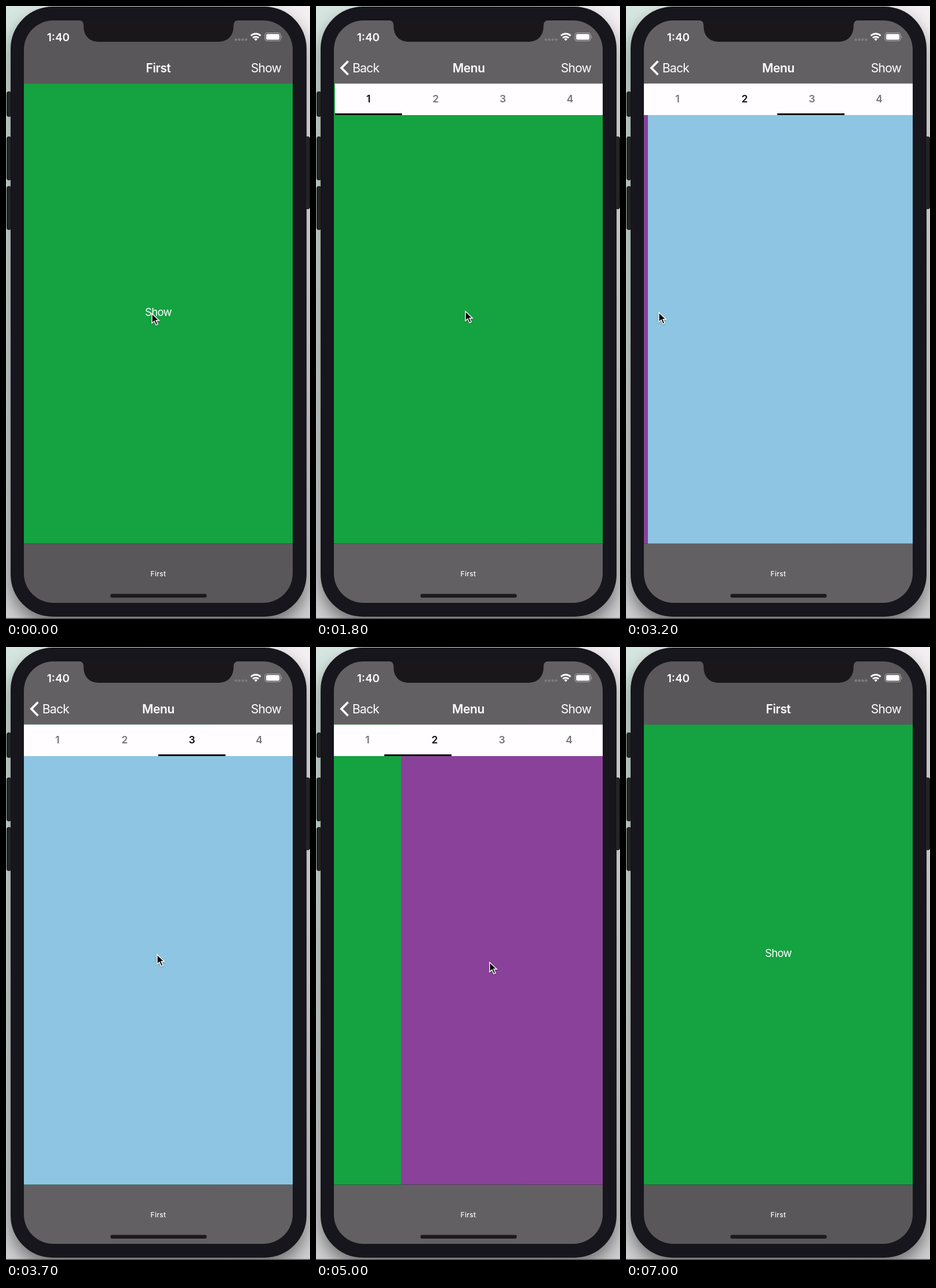
Recreate the animation shown at these times as an HTML page. Size 527 by 1062 pixels, loop 7.1 s.

```html
<!DOCTYPE html>
<html lang="en">
<head>
<meta charset="utf-8">
<title>Tabbed menu</title>
<style>
  html, body { margin: 0; width: 100%; height: 100%; overflow: hidden; }
  svg { display: block; width: 527px; height: 1062px; }
  text { font-family: Inter, "Open Sans", sans-serif; fill: #fff; }
  .title { font-size: 21px; font-weight: 600; letter-spacing: -.4px; text-anchor: middle; }
  .item { font-size: 21.2px; letter-spacing: -.8px; }
  .button { font-size: 18.6px; letter-spacing: -.7px; text-anchor: middle; }
  .small { font-size: 12px; font-weight: 500; letter-spacing: .3px; text-anchor: middle; }
  .tab { font-size: 17.5px; font-weight: 600; text-anchor: middle; }
</style>
</head>
<body>
<svg viewBox="0 0 527 1062">
  <defs>
    <linearGradient id="desk">
      <stop offset="0" stop-color="#d3e4de"/>
      <stop offset=".2" stop-color="#e4ebe9"/>
      <stop offset="1" stop-color="#f3eff2"/>
    </linearGradient>
    <linearGradient id="floor" x2="0" y2="1">
      <stop offset=".3" stop-color="#d0d0d2" stop-opacity="0"/>
      <stop offset="1" stop-color="#d0d0d2"/>
    </linearGradient>
    <filter id="shade" x="-20%" y="-10%" width="140%" height="120%">
      <feDropShadow dx="0" dy="14" stdDeviation="14" flood-opacity=".45"/>
    </filter>
    <filter id="soft" x="-50%" y="-50%" width="200%" height="200%">
      <feDropShadow dx="0" dy="1" stdDeviation="1" flood-opacity=".4"/>
    </filter>
    <clipPath id="screen"><rect x="31" y="25" width="466" height="1009" rx="51"/></clipPath>
    <clipPath id="content"><rect x="31" y="134.5" width="466" height="797"/></clipPath>
  </defs>

  <rect width="527" height="1062" fill="url(#desk)"/>
  <rect width="527" height="1062" fill="url(#floor)"/>
  <rect x="8" y="1" width="513" height="1057" rx="73" fill="#19171a" filter="url(#shade)"/>
  <g fill="#242427" stroke="#111013">
    <rect x="1.5" y="148.5" width="7" height="43" rx="3"/>
    <rect x="1.5" y="226.5" width="7" height="75" rx="3"/>
    <rect x="1.5" y="312.5" width="7" height="75" rx="3"/>
    <rect x="519.5" y="226.5" width="7" height="125" rx="3"/>
  </g>
  <rect y="1060.5" width="527" height="1.5" fill="#4b4b4d"/>

  <g clip-path="url(#screen)">
    <rect id="bars" x="31" y="25" width="466" height="1009"/>
    <g clip-path="url(#content)">
      <g id="first">
        <rect x="31" y="134" width="466" height="798" fill="#15a241"/>
        <text id="show" class="button" x="264" y="536.5">Show</text>
      </g>
      <rect id="dim" x="31" y="134" width="466" height="798"/>
      <g id="menu">
        <svg x="31" y="134" width="466" height="798">
          <g id="pages">
            <rect width="467" height="798" fill="#15a241"/>
            <rect x="466" width="466" height="798" fill="#8a4199"/>
            <rect x="932" width="466" height="798" fill="#8dc5e2"/>
          </g>
          <rect width="466" height="55" fill="#fffdff"/>
          <g id="tabs"></g>
          <rect id="line" y="52" width="116.5" height="3" fill="#0b090b"/>
        </svg>
      </g>
    </g>
    <path d="M31 931.5H497" stroke="#000" stroke-opacity=".25"/>

    <text id="firstTitle" class="title" y="115">First</text>
    <text id="menuTitle" class="title" y="115">Menu</text>
    <g id="back">
      <path d="M55.5 95.500 44 107.300 55.500 119" fill="none" stroke="#fff" stroke-width="3.8"/>
      <text class="item" x="63" y="114.500">Back</text>
    </g>
    <text class="item" x="424.500" y="114.500">Show</text>
    <text class="small" x="264" y="988">First</text>
    <rect x="181" y="1018.500" width="167" height="6.500" rx="3.200" fill="#1c1a1d"/>

    <path d="M125 24.500q9.500 0 9.500 9.500c0 18 10 28 28 28H366.500c18 0 28-10 28-28q0-9.500 9.500-9.500z" fill="#19171a"/>
    <text x="90.700" y="60.500" font-size="19" font-weight="600" text-anchor="middle">1:40</text>
    <path d="M398.500 58.200h18" stroke="#7f7c80" stroke-width="4.600" stroke-linecap="round" stroke-dasharray="0 5.900"/>
    <g fill="none" stroke="#fff" stroke-width="2.900">
      <path d="M424.600 51.500a12 12 0 0 1 16.800 0M427.800 55.300a7.500 7.500 0 0 1 10.400 0"/>
      <path d="M430.200 57.300 433 60.500 435.800 57.300a4 4 0 0 0-5.600 0z" fill="#fff" stroke="none"/>
    </g>
    <rect x="449" y="46.500" width="27" height="14" rx="4" fill="none" stroke="#aaa8ab" stroke-width="1.200"/>
    <rect x="451" y="48.500" width="23" height="10" rx="2.200" fill="#fff"/>
    <path d="M477.500 51.500q2 2 0 4.500z" fill="#aaa8ab"/>
  </g>

  <g id="cursor" filter="url(#soft)">
    <path d="M1 2V18.500L5 14.800 8.200 21.800 11.200 20.500 8.100 13.700H13.300Z" fill="#050505" stroke="#fff" stroke-width="1.400"/>
  </g>
</svg>
<script>
const LOOP = 7100, STEP = 100, WIDTH = 466, TAB = WIDTH / 4;
const $ = id => document.getElementById(id);

// Keys are [time in units of 100 ms, value].
const push = [[13, 0], [14, .16], [15, .68], [16, .92], [17, .98], [18, .9966], [19, 1],
  [56, 1], [57, .88], [58, .55], [59, .2], [60, .05], [61, .01], [62, 0]];
const page = [[19, 0], [20, .04], [21, .25], [22, .7], [23, .93], [25, 1], [26, 1],
  [27, 1.0064], [28, 1.15], [29, 1.45], [30, 1.8], [31, 1.95], [32, 1.985], [34, 2],
  [41, 2], [42, 1.85], [43, 1.4], [44, 1.075], [45, 1.02], [46, 1],
  [49, 1], [50, .75], [51, .35], [52, .1], [53, .02], [54, 0]];
const cursorX = [[0, 252], [1, 258], [19, 258], [20, 240], [22, 60], [23, 90], [26, 264],
  [27, 253], [28, 190], [29, 60], [30, 28], [33, 70], [37, 261], [41, 225], [42, 290],
  [43, 440], [44, 486], [46, 380], [48, 200], [49, 190], [50, 300], [51, 450], [52, 470],
  [55, 174], [56, 174], [57, 230], [58, 380], [59, 450]];
const cursorY = [[0, 531], [1, 527], [27, 527], [37, 531], [44, 546], [55, 543]];
const selection = [[0, 0], [25, 1], [34, 2], [46, 1], [54, 0]];

function valueAt(keys, time) {
  const next = keys.findIndex(key => key[0] > time);
  if (next === 0) return keys[0][1];
  if (next < 0) return keys[keys.length - 1][1];
  const [t0, a] = keys[next - 1], [t1, b] = keys[next];
  return a + (b - a) * (time - t0) / (t1 - t0);
}

const move = (id, x, y = 0) => $(id).setAttribute("transform", `translate(${x} ${y})`);
const fade = (id, opacity) => $(id).setAttribute("opacity", opacity);

const labels = [1, 2, 3, 4].map((n, i) => {
  const label = document.createElementNS("http://www.w3.org/2000/svg", "text");
  label.setAttribute("class", "tab");
  label.setAttribute("x", TAB * (i + .5));
  label.setAttribute("y", 33);
  label.textContent = n;
  return $("tabs").appendChild(label);
});

function draw(now) {
  const time = Math.floor(now % LOOP / STEP);
  const shown = valueAt(push, time), scroll = valueAt(page, time);
  const selected = selection.filter(key => key[0] <= time).pop()[1];
  const gray = [90, 87, 90].map(c => c + 9 * shown);

  $("bars").style.fill = `rgb(${gray})`;
  move("first", -.3 * WIDTH * shown);
  fade("show", time >= 10 && time < 14 ? .35 : 1);
  fade("dim", .1 * shown * (shown < .99));
  move("menu", WIDTH * (1 - shown));
  fade("menu", shown > 0 ? 1 : 0);
  move("pages", -WIDTH * scroll);
  move("line", TAB * scroll);
  labels.forEach((label, i) => label.style.fill = i === selected ? "#0b090b" : "#77747a");

  move("firstTitle", 264 - 150 * shown);
  fade("firstTitle", Math.max(0, 1 - 1.5 * shown));
  move("menuTitle", 264 + 200 * (1 - shown));
  fade("menuTitle", shown);
  move("back", 50 * (1 - shown));
  fade("back", shown);

  move("cursor", valueAt(cursorX, time), valueAt(cursorY, time));
  fade("cursor", time < 62 ? 1 : 0);
  requestAnimationFrame(() => draw(performance.now() - start));
}

const start = performance.now();
draw(0);
</script>
</body>
</html>
```
